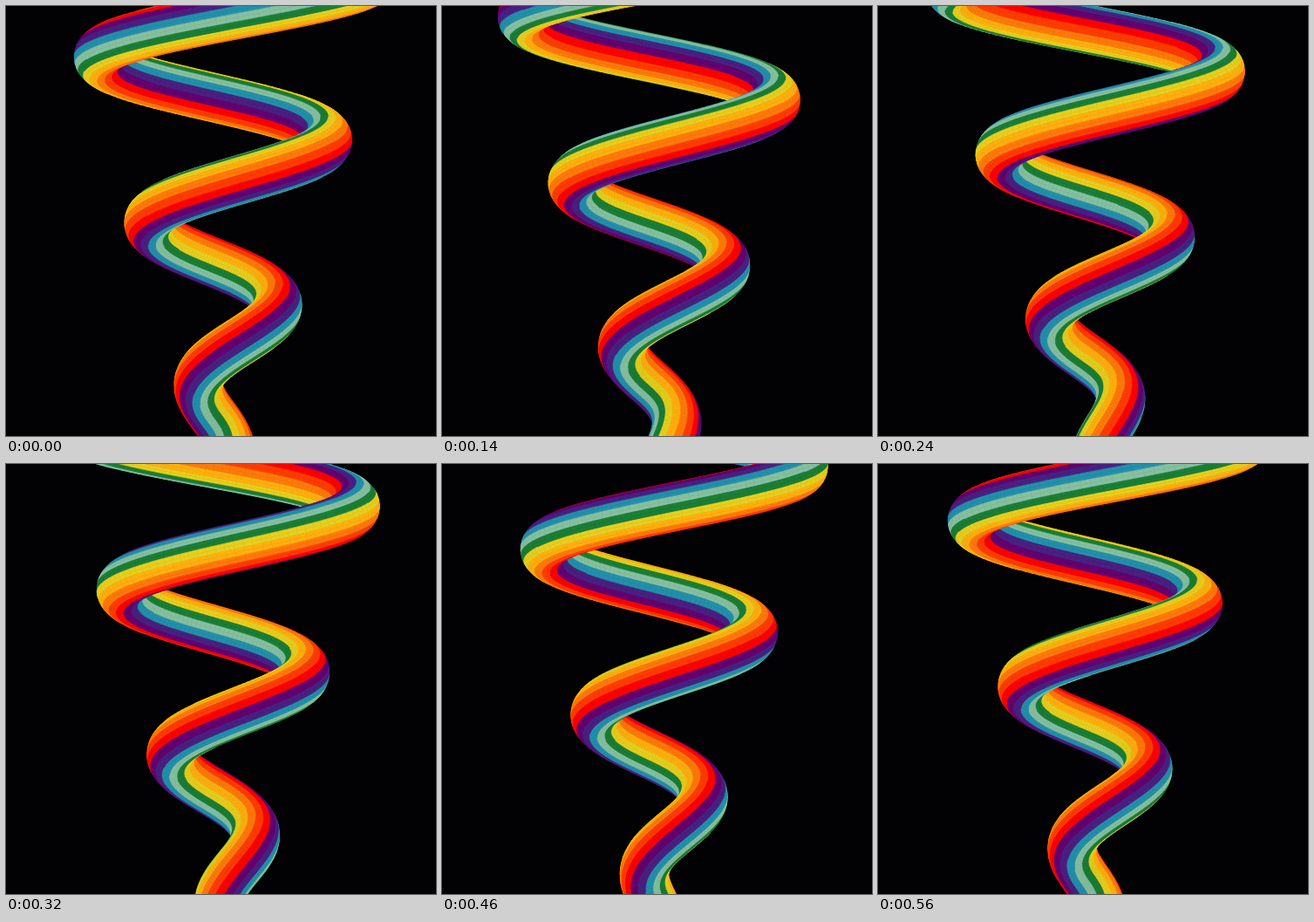
An HTML page with a canvas that plays this animation: 493x493 px, repeating every 580 ms.

```html
<!DOCTYPE html>
<html lang="en">
<head>
<meta charset="utf-8">
<title>Rainbow helix</title>
<style>
  html, body { margin: 0; width: 100%; height: 100%; overflow: hidden; background: #020103; }
  canvas { display: block; }
</style>
</head>
<body>
<canvas id="stage" width="493" height="493"></canvas>
<script>
const ctx = document.getElementById('stage').getContext('2d');
const SIZE = 493, LOOP = 580, STEP = 20, TAU = Math.PI * 2;

// Cone-shaped helix: radius shrinks with y, one turn per PITCH pixels.
const CX = 251.8, PITCH = 191.5, TOP_R = 163.7, TAPER = -0.302, TUBE = 27.75;
const Y0 = -44, Y1 = 532, DY = 2, SPIN = TAU / PITCH, RIGHT_Y = 156;

// Ten colours, twice around the tube, two facets per stripe.
const COLORS = ['#fe0000', '#ff3c00', '#ff7a0a', '#ffb00f', '#e8cf1e',
                '#1a7f37', '#86c0a0', '#2290ab', '#4a2080', '#640070'];
const STRIPES = 20, FACETS = 40, FIRST_STRIPE = 5.8;

const radius = y => Math.max(0, TOP_R + TAPER * y);

// Stripe offset along the tube, following a twist-free frame.
const offsets = [];
for (let y = Y0, u = FIRST_STRIPE; y <= Y1; y += DY) {
  offsets.push(u);
  const r = radius(y + DY / 2);
  const len = Math.hypot(1, TAPER, r * SPIN);
  const q = (TAPER / len) ** 2;
  u += DY * STRIPES / PITCH / len * (1 - 2 * q) / (1 - q);
}

function ring(i, p) {
  const y = Y0 + i * DY, r = radius(y);
  const a = (y - RIGHT_Y) * SPIN + p * TAU;
  const c = Math.cos(a), s = Math.sin(a);
  const len = Math.hypot(1, TAPER, r * SPIN);
  const tx = (TAPER * c - r * SPIN * s) / len;
  const ty = 1 / len;
  const tz = (TAPER * s + r * SPIN * c) / len;
  // Outward normal n, upward binormal b = n x t.
  const d = c * tx + s * tz;
  let nx = c - d * tx, ny = -d * ty, nz = s - d * tz;
  const m = Math.hypot(nx, ny, nz);
  nx /= m; ny /= m; nz /= m;
  const bx = ny * tz - nz * ty, by = nz * tx - nx * tz, bz = nx * ty - ny * tx;
  const u = offsets[i] + 10 * p;
  const pts = [];
  for (let j = 0; j <= FACETS; j++) {
    const w = (j * STRIPES / FACETS - u) * TAU / STRIPES;
    const k = TUBE * Math.cos(w), l = TUBE * Math.sin(w);
    pts.push([CX + r * c + k * nx + l * bx, y + k * ny + l * by, r * s + k * nz + l * bz]);
  }
  return pts;
}

function draw(p) {
  const faces = [];
  let prev = ring(0, p);
  for (let i = 1; i < offsets.length; i++) {
    const next = ring(i, p);
    for (let j = 0; j < FACETS; j++) {
      const a = prev[j], b = prev[j + 1], c = next[j + 1], d = next[j];
      const area = (c[0] - a[0]) * (b[1] - d[1]) - (c[1] - a[1]) * (b[0] - d[0]);
      if (area > 0) {
        faces.push({ z: a[2] + b[2] + c[2] + d[2], pts: [a, b, c, d], color: COLORS[(j >> 1) % 10] });
      }
    }
    prev = next;
  }
  faces.sort((f, g) => f.z - g.z);

  ctx.fillStyle = '#020103';
  ctx.fillRect(0, 0, SIZE, SIZE);
  ctx.lineWidth = 0.6;
  ctx.lineJoin = 'round';
  for (const { pts, color } of faces) {
    ctx.fillStyle = ctx.strokeStyle = color;
    ctx.beginPath();
    for (const [x, y] of pts) ctx.lineTo(x, y);
    ctx.closePath();
    ctx.fill();
    ctx.stroke();
  }
}

const start = performance.now();
let shown = -1;
function tick() {
  const step = Math.floor((performance.now() - start) % LOOP / STEP);
  if (step !== shown) {
    shown = step;
    draw(step * STEP / LOOP);
  }
  requestAnimationFrame(tick);
}
tick();
</script>
</body>
</html>
```
